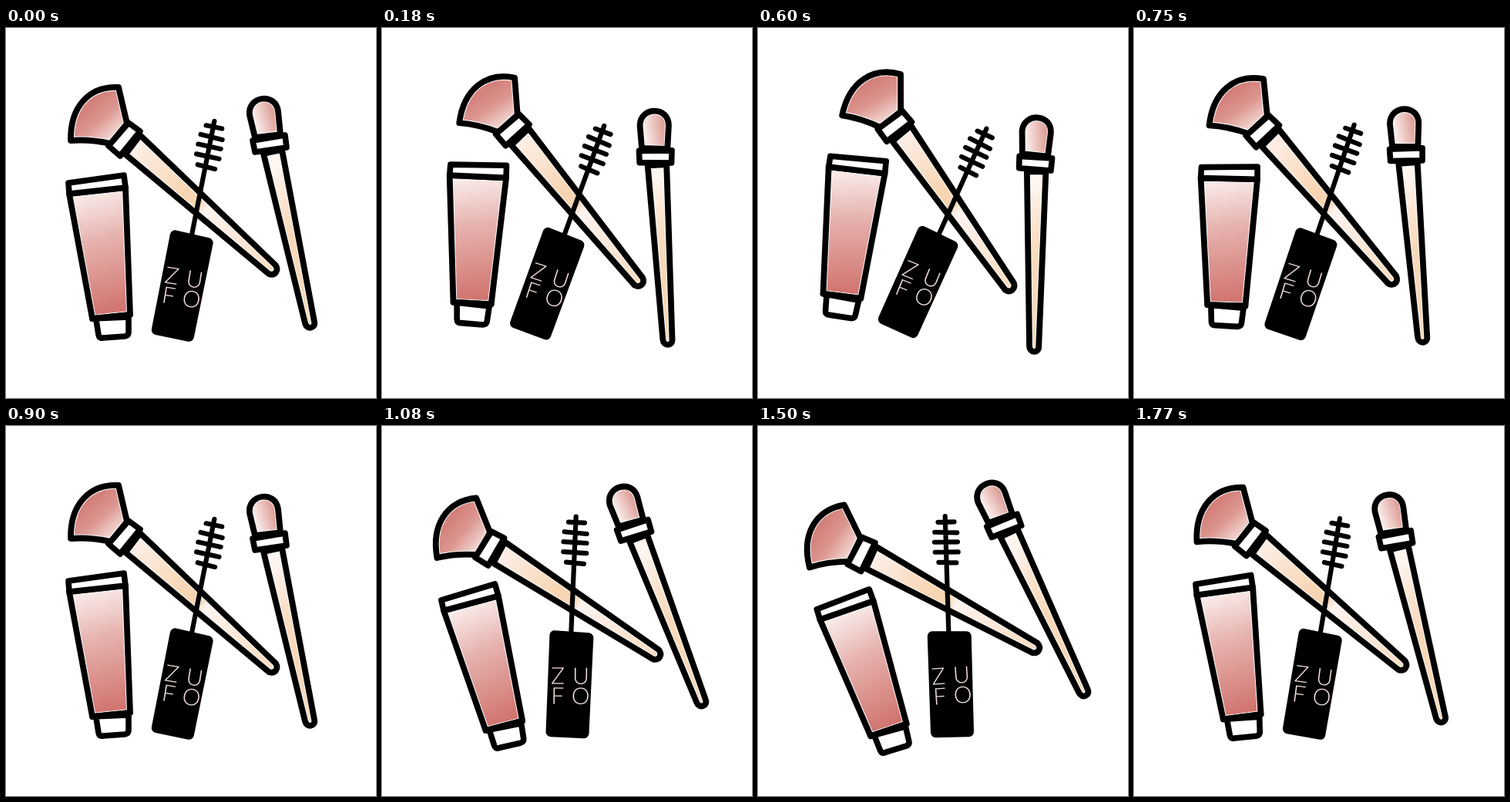
Write an HTML page that moves like this. It is 480 px wide and 480 px high and loops after 1.8 s.

```html
<!DOCTYPE html>
<html lang="en">
<head>
<meta charset="utf-8">
<title>Swaying make-up set</title>
<style>
  html, body { margin: 0; height: 100%; overflow: hidden; background: #fff; }
  svg { display: block; width: 100%; height: 100%; }
  .line { fill: none; stroke: #000; stroke-width: 7.8; }
  .fringe { fill: none; stroke: #fff; stroke-width: 9.8; stroke-dasharray: 3 2; }
  .white { fill: #fff; stroke: #000; stroke-width: 7.6; }
  .label { font: 300 30px Lato, Inter, sans-serif; fill: #f3e2de; text-anchor: middle; }
</style>
</head>
<body>
<svg viewBox="0 0 480 480" stroke-linejoin="round" stroke-linecap="round">
  <defs>
    <linearGradient id="fan" gradientUnits="userSpaceOnUse" x1="102" y1="92" x2="146" y2="142">
      <stop offset=".15" stop-color="#d4807b"/><stop offset=".5" stop-color="#dc9690"/><stop offset="1" stop-color="#f8e4df"/>
    </linearGradient>
    <linearGradient id="handle" gradientUnits="userSpaceOnUse" x1="164" y1="150" x2="347" y2="314">
      <stop offset="0" stop-color="#fdf0ea"/><stop offset=".38" stop-color="#f8d5b2"/>
      <stop offset=".47" stop-color="#f8d5b2"/><stop offset=".52" stop-color="#fef4f0"/><stop offset="1" stop-color="#f9dabd"/>
    </linearGradient>
    <linearGradient id="head" gradientUnits="userSpaceOnUse" x1="320" y1="122" x2="354" y2="112">
      <stop offset="0" stop-color="#fdf6f4"/><stop offset="1" stop-color="#d88d86"/>
    </linearGradient>
    <linearGradient id="stick" gradientUnits="userSpaceOnUse" x1="334" y1="190" x2="390" y2="260">
      <stop offset="0" stop-color="#fef5f1"/><stop offset=".6" stop-color="#fae0c8"/><stop offset="1" stop-color="#f9d8b8"/>
    </linearGradient>
    <linearGradient id="tube" gradientUnits="userSpaceOnUse" x1="98" y1="212" x2="142" y2="374">
      <stop offset="0" stop-color="#fbf0ee"/><stop offset=".4" stop-color="#e6b2ae"/><stop offset="1" stop-color="#d0706b"/>
    </linearGradient>
  </defs>
  <g id="set">
    <g id="tinted"></g>

    <path class="white" d="M159 123L174 134L148 166L133 153Z"/>
    <path class="white" d="M320 146L362 139L364 155L323 161Z"/>
    <path class="white" d="M81 201L153 191L155 207L82 215Z"/>
    <path class="white" d="M117 379L120 398Q121 403 126 402L154 400Q159 399 159 395V375L112 377L161 372"/>

    <g transform="rotate(14.26 240 240)">
      <path class="line" style="stroke-width:6.2" d="M240 117L248 268
        M231 125L252 124M227 138L256 138M227 151L257 150M228 164L258 163M233 177L256 177"/>
      <path stroke="#000" stroke-width="13" d="M227 273L271 272L277 396L234 398Z"/>
      <g class="label" transform="rotate(-5 252 336)">
        <text x="237" y="334">Z</text><text x="267" y="334">U</text>
        <text x="237" y="360">F</text><text x="267" y="360">O</text>
      </g>
    </g>
  </g>
</svg>
<script>
  const shapes = {
    fan: "M146 77C108 75 83 102 84 146Q108 144 136 150L157 124Z",
    handle: "M174 139L350 308C354 315 349 322 341 319L155 164Z",
    head: "M323 142L316 113C313 88 350 83 353 108L356 138Z",
    stick: "M334 163L388 383C390 392 402 390 400 381L358 158Z",
    tube: "M82 215L155 207L161 372L112 377Z"
  };
  const path = (d, attr) => `<path d="${d}" ${attr}/>`;
  document.getElementById("tinted").innerHTML = Object.entries(shapes).map(([name, d]) =>
    path(d, `fill="url(#${name})"`) + path(d, 'class="fringe"') + path(d, 'class="line"')).join("");

  const LOOP = 1800, STEP = 30, SWING = 15;
  const set = document.getElementById("set");
  const start = performance.now();

  function draw() {
    const t = Math.floor((performance.now() - start) / STEP) * STEP % LOOP;
    const angle = SWING * Math.sin(2 * Math.PI * t / LOOP);
    set.setAttribute("transform", `rotate(${angle} 240 240)`);
    requestAnimationFrame(draw);
  }
  draw();
</script>
</body>
</html>
```
